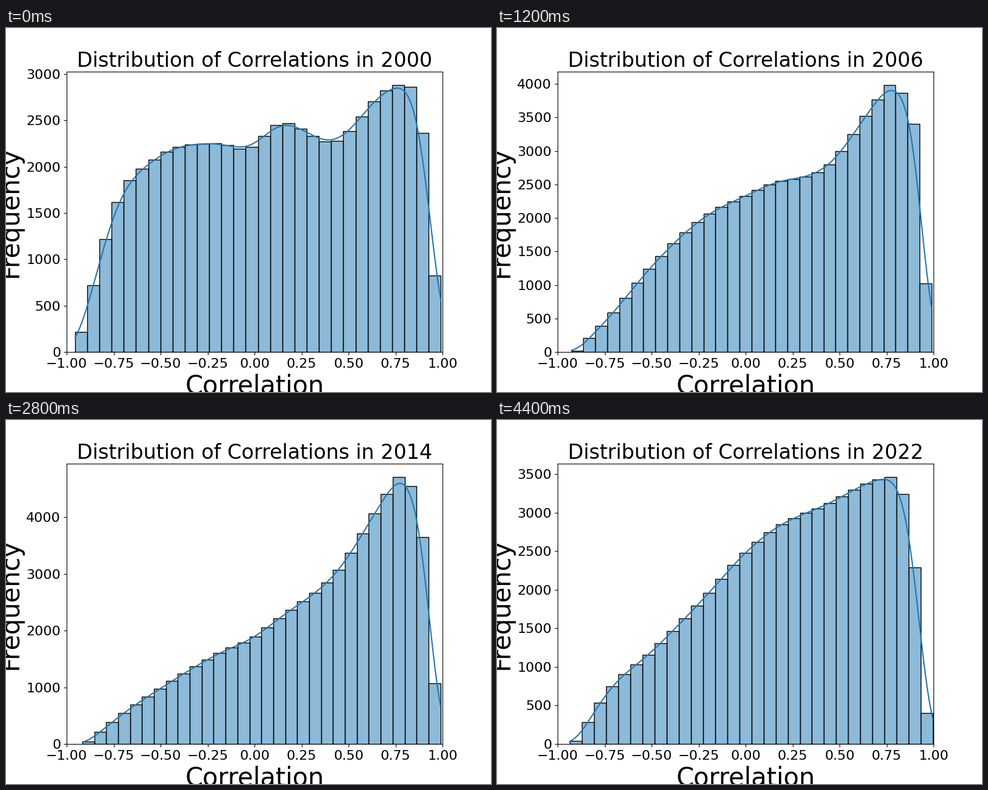
A matplotlib script that plays this animation: 800 by 600 pixels, repeating every 4600 ms.

```python
import numpy as np
import matplotlib.pyplot as plt
from matplotlib.animation import FuncAnimation
from matplotlib.colors import to_rgba

plt.rcParams["font.family"] = "DejaVu Sans"

FIRST, YEARS = 2000, 23
BLUE = "#1f77b4"
BINS = 30
SUB = 16  # samples per bin for the smooth curve
PEAKED = 2003, 2009

# Key bars of the outline: body of the histogram, then the steep right end.
KEYS = [0, 3, 6, 11, 14, 16, 21, 25, 26, 27, 28, 29]
# year: range of the data, then the counts at the key bars
OUTLINES = {
    2000: [-0.9551, 0.9913, 215, 1618, 2076, 2253, 2214, 2449, 2279,
           2823, 2882, 2862, 2364, 825],
    2002: [-0.905, 0.988, 43, 566, 1058, 1624, 2144, 2543, 3164,
           4084, 4037, 3805, 2868, 844],
    2006: [-0.927, 0.990, 18, 588, 1240, 2063, 2326, 2498, 2796,
           3765, 3982, 3864, 3403, 1023],
    2008: [-0.852, 0.990, 10, 60, 140, 631, 977, 1262, 2728,
           5762, 7513, 8957, 8775, 2973],
    2012: [-0.958, 0.985, 65, 701, 1318, 2009, 2196, 2430, 2907,
           3795, 4112, 3776, 2467, 589],
    2016: [-0.875, 0.993, 20, 399, 628, 1196, 1595, 2005, 3237,
           5013, 5303, 5315, 4832, 1546],
    2022: [-0.9354, 0.9975, 37, 748, 1158, 1961, 2481, 2748, 3126,
           3433, 3462, 3244, 2292, 402],
}


def spline(x, xs, ys):
    """Cubic Hermite curve through a few points."""
    slope = np.gradient(ys, xs)
    k = np.clip(np.searchsorted(xs, x, side="right") - 1, 0, len(xs) - 2)
    h = np.diff(xs)[k]
    t = (x - np.take(xs, k)) / h
    a, b = ys[k], ys[k + 1]
    return (a + (b - a) * t * t * (3 - 2 * t)
            + h * t * (1 - t) * (slope[k] * (1 - t) - slope[k + 1] * t))


def histogram(year):
    """Data range and bar heights; years between outlines are blended."""
    peaked = year in PEAKED
    columns = zip(*OUTLINES.values())
    lo, hi, *keys = (np.interp(2008 if peaked else year, list(OUTLINES), c)
                     for c in columns)
    counts = spline(np.arange(BINS), KEYS, np.array(keys))
    if peaked:
        sharp = counts ** 1.2
        counts = sharp * counts.sum() / sharp.sum()
    return lo, hi, counts


def smooth(lo, hi, counts):
    """Gaussian density estimate (Scott's rule), scaled to the counts."""
    m = np.pad(counts, 1)
    inner = (7 * (m[1:-2] + m[2:-1]) - m[:-3] - m[3:]) / 12
    left, right = np.r_[0, inner], np.r_[inner, 0]
    t = (np.arange(SUB) + 0.5) / SUB
    # parabola in each bin that keeps the bin's mean
    bend = 6 * (counts - (left + right) / 2)
    dens = (left[:, None] + (right - left)[:, None] * t
            + bend[:, None] * t * (1 - t))
    dens = np.clip(dens, 0, None).ravel()
    step = (hi - lo) / dens.size
    pos = lo + (np.arange(dens.size) + 0.5) * step
    mean = np.average(pos, weights=dens)
    std = np.sqrt(np.average((pos - mean) ** 2, weights=dens))
    bw = std * counts.sum() ** -0.2
    x = np.linspace(lo, hi, 200)
    kernel = np.exp(-0.5 * ((x[:, None] - pos) / bw) ** 2)
    return x, kernel @ dens * step / (bw * np.sqrt(2 * np.pi))


fig, ax = plt.subplots(figsize=(8, 6), dpi=100)


def draw(i):
    year = FIRST + i
    lo, hi, counts = histogram(year)
    edges = np.linspace(lo, hi, BINS + 1)
    ax.clear()
    ax.bar(edges[:-1], counts, width=np.diff(edges), align="edge",
           facecolor=to_rgba(BLUE, 0.5), edgecolor="black", linewidth=1)
    ax.plot(*smooth(lo, hi, counts), color=BLUE, lw=1.5)
    ax.set_xlim(-1, 1)
    ax.set_ylim(0, counts.max() * 1.05)
    ax.tick_params(labelsize=16)
    ax.set_title(f"Distribution of Correlations in {year}", fontsize=24)
    ax.set_xlabel("Correlation", fontsize=30)
    ax.set_ylabel("Frequency", fontsize=30)
    return ax.get_children()


anim = FuncAnimation(fig, draw, frames=YEARS, interval=200, repeat=True,
                     init_func=lambda: draw(0))
plt.show()
```
